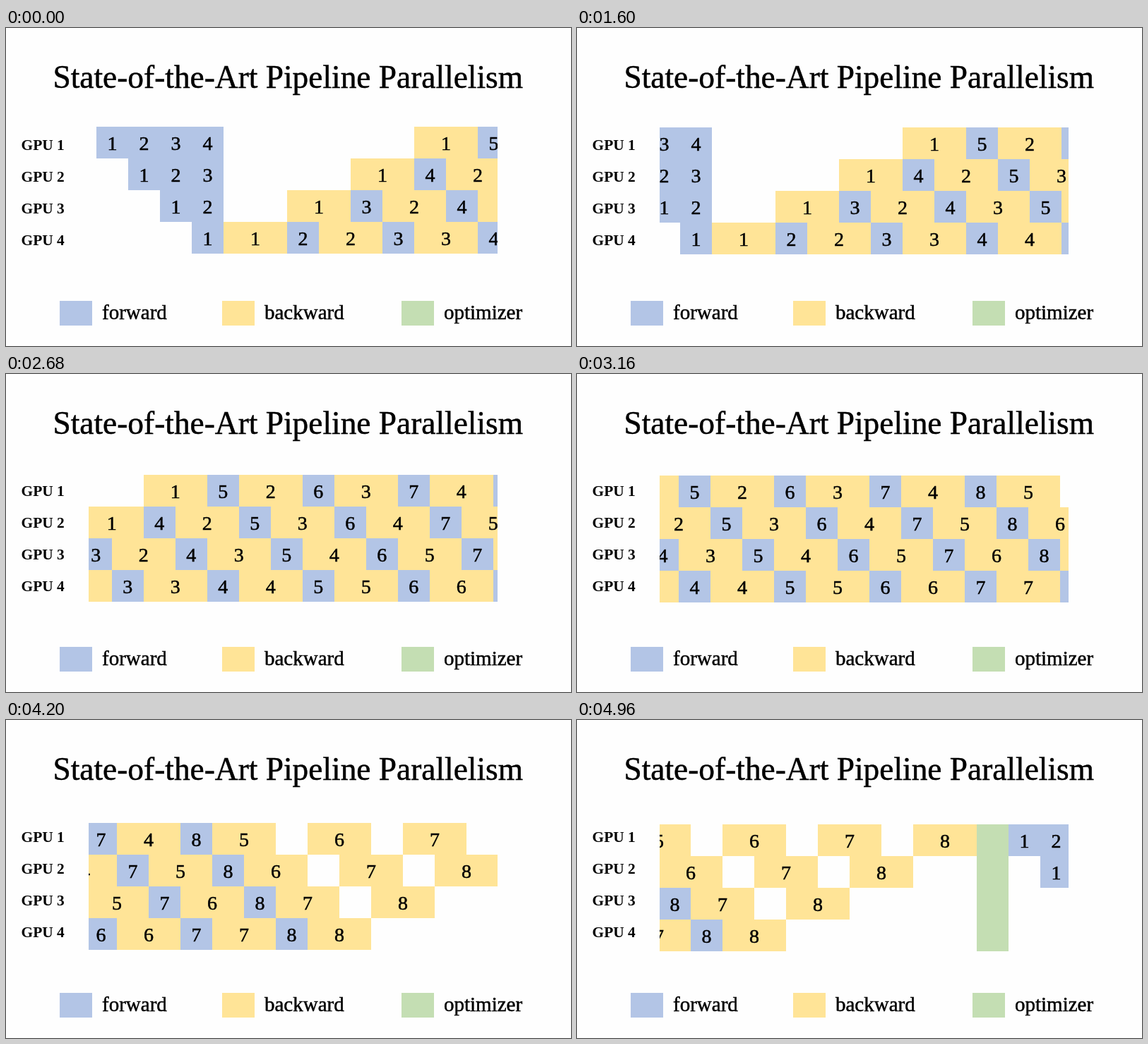
Animation of 800x451 px, one loop 5.04 s. Source, as an HTML page:

```html
<!DOCTYPE html>
<html lang="en">
<head>
<meta charset="utf-8">
<title>Pipeline Parallelism</title>
<style>
  html, body { margin: 0; height: 100%; overflow: hidden; background: #fefefe; }
  svg { display: block; }
  text { font: 29px "Liberation Serif", serif; stroke: #000; stroke-width: .5px; }
  .title { font-size: 45.4px; }
  .gpu { font-size: 21.4px; font-weight: bold; stroke: none; }
  .cell { font-size: 28px; text-anchor: middle; }
  rect { shape-rendering: crispEdges; }
  .forward { fill: #b3c5e6; }
  .backward { fill: #ffe497; }
  .optimizer { fill: #c4deb3; }
</style>
</head>
<body>
<svg id="stage" width="800" height="451" viewBox="0 0 800 451">
  <clipPath id="window"><rect x="117" y="130" width="579" height="210"/></clipPath>
  <text class="title" x="66.5" y="85">State-of-the-Art Pipeline Parallelism</text>
  <g clip-path="url(#window)"><g id="track"></g></g>
</svg>
<script>
const LOOP = 5040, STEP = 80, CELL = 45, LEFT = 128, TOP = 140;
const GPUS = 4, BATCHES = 8, CYCLE = 34;
const stage = document.getElementById('stage');
const track = document.getElementById('track');

function add(parent, tag, attrs, text = '') {
  const node = document.createElementNS('http://www.w3.org/2000/svg', tag);
  for (const key in attrs) node.setAttribute(key, attrs[key]);
  node.textContent = text;
  parent.append(node);
}

function block(kind, row, col, label, cols = 1, rows = 1) {
  const x = LEFT + col * CELL, y = TOP + row * CELL;
  add(track, 'rect', { class: kind, x, y, width: cols * CELL, height: rows * CELL });
  add(track, 'text', { class: 'cell', x: x + cols * CELL / 2, y: y + 33 }, label);
}

for (let gpu = 0; gpu < GPUS; gpu++) {
  add(stage, 'text', { class: 'gpu', x: 21.5, y: 173 + gpu * CELL }, `GPU ${gpu + 1}`);
  const warmup = GPUS - gpu;
  for (let i = 1; i <= BATCHES; i++) {
    const fill = gpu + i - 1;
    block('forward', gpu, i <= warmup ? fill : 3 * i + gpu - 3, i);
    block('backward', gpu, 7 - 2 * gpu + 3 * i, i, 2);
    if (i <= warmup) block('forward', gpu, CYCLE + fill, i);
  }
}
block('optimizer', 0, CYCLE - 1, '', 1, GPUS);

for (const [kind, x] of [['forward', 76], ['backward', 306], ['optimizer', 560]]) {
  add(stage, 'rect', { class: kind, x, y: 387, width: 46, height: 35 });
  add(stage, 'text', { x: x + 60, y: 413 }, kind);
}

// Time, distance and speed along the scroll, joined by cubic curves
const path = [
  [0, 0, 0], [346, 0, 0], [1040, 36, .104], [2160, 246, .275],
  [3120, 524, .289], [4160, 826, .287], [4960, 1047, .268], [5040, 1068, .26]
];

function distance(t) {
  const i = path.findIndex(knot => knot[0] > t);
  const [t0, x0, v0] = path[i - 1], [t1, x1, v1] = path[i];
  const span = t1 - t0, u = (t - t0) / span, w = 1 - u;
  return x0 * w * w * (1 + 2 * u) + x1 * u * u * (3 - 2 * u)
    + span * u * w * (v0 * w - v1 * u);
}

function draw() {
  const t = Math.floor(performance.now() % LOOP / STEP) * STEP;
  const d = distance(t);
  track.setAttribute('transform', `translate(${-d} ${d * .0076})`);
  requestAnimationFrame(draw);
}
draw();
</script>
</body>
</html>
```
